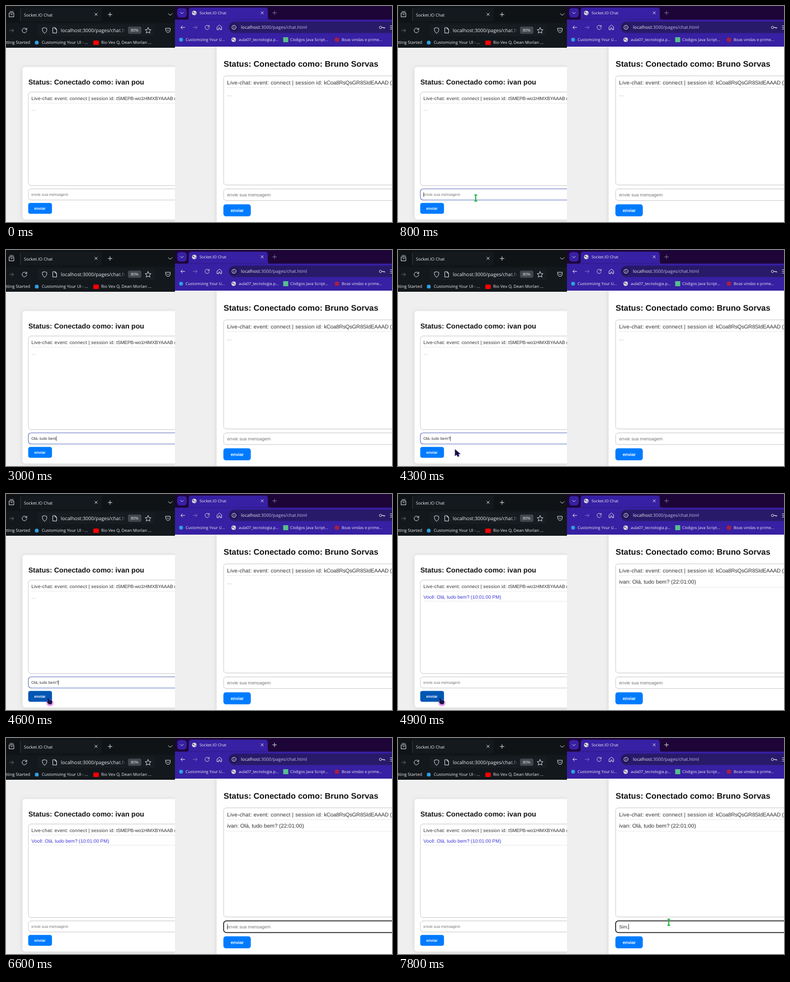
Recreate the animation shown at these times as an HTML page. Size 690 by 388 pixels, loop 8 s.

```html
<!DOCTYPE html>
<html lang="pt-BR">
<head>
<meta charset="utf-8">
<title>Chat</title>
<style>
html, body { margin: 0; width: 100%; height: 100%; overflow: hidden; background: #efefef; }
#stage { display: block; width: 690px; height: 388px; }
text { text-rendering: geometricPrecision; white-space: pre; }
.ui { font-family: "Open Sans", "Noto Sans", sans-serif; fill: #ececf0; }
.page { font-family: "Liberation Sans", Arial, sans-serif; fill: #333; }
.icon { fill: none; stroke: #d6d6de; stroke-width: 1; stroke-linecap: round; stroke-linejoin: round; }
.dim { opacity: .4; }
.title { font-weight: bold; fill: #121212; }
.card { fill: #fff; filter: drop-shadow(0 1px 4px rgba(0, 0, 0, .11)); }
.box { fill: #fff; stroke: #ccc; }
.rule { stroke: #ececec; }
.log { letter-spacing: .024em; }
.log tspan { letter-spacing: -.02em; }
.hint { fill: #757575; }
.wait { fill: #999; }
.btn { fill: #007bff; }
.btn.hover { fill: #0056b3; }
.send { fill: #fff; font-weight: bold; text-anchor: middle; }
#left .focus { stroke: #6b7cc0; stroke-width: 1.2; }
#right .focus { stroke: #161616; stroke-width: 1.5; }
.caret { stroke: #222; stroke-width: .8; }
</style>
</head>
<body>
<svg id="stage" viewBox="0 0 690 388">
  <defs>
    <linearGradient id="fade"><stop offset="0" stop-color="#171c21" stop-opacity="0"/><stop offset="1" stop-color="#171c21"/></linearGradient>
    <radialGradient id="glow"><stop offset="0" stop-color="#ff4fc8"/><stop offset=".5" stop-color="#d05ae0" stop-opacity=".7"/><stop offset="1" stop-color="#d05ae0" stop-opacity="0"/></radialGradient>
    <path id="reload" d="M3.4-2.6A4.2 4.2 0 1 0 4.2 .6M4.2-4.4V-1.6H1.4"/>
    <path id="cross" d="M-2.2-2.2 2.2 2.2M2.2-2.2-2.2 2.2"/>
    <path id="plus" d="M-3.5 0H3.5M0-3.5V3.5"/>
    <path id="forward" d="M-3.5 0H3.5M.6-3 3.5 0 .6 3"/>
    <g id="globe"><circle r="4" fill="#dcdce6"/><path d="M-3-1.5-1-2.5 0-.5-1.5 1ZM.5 .5 3 0 1.8 2.6Z" fill="#56566c"/></g>
  </defs>

  <svg id="left" width="302" height="388">
    <rect width="302" height="75" fill="#13181c"/>
    <rect width="302" height="30" fill="#0f1316"/>
    <rect x="27" y="3" width="144" height="25" rx="3" fill="#13191d"/>
    <path d="M26 5V27" stroke="#3a4046"/>
    <g class="icon">
      <path d="M6 12.5H14V19.5H6ZM7 10H13"/>
      <path d="M8.5 15.5H11.5"/>
      <use href="#cross" x="161" y="15"/>
      <use href="#plus" x="186" y="15.3"/>
      <path d="M290 13.5 293.5 17 297 13.5"/>
    </g>
    <text class="ui" x="32" y="18.6" font-size="7.6">Socket.IO Chat</text>

    <rect x="57" y="33" width="209" height="21" rx="3" fill="#171c21"/>
    <g class="icon">
      <use class="dim" href="#forward" x="10" y="44"/>
      <use href="#reload" x="33" y="44"/>
      <path d="M69 39 73 40.4C73 45 72 47 69 49C66 47 65 45 65 40.4Z"/>
      <path d="M84 39H88L90.5 41.5V48.5H84ZM88 39V41.5H90.5"/>
      <path d="M254 38.8 255.6 42.2 259.2 42.6 256.5 45.1 257.3 48.7 254 46.9 250.7 48.7 251.5 45.1 248.8 42.6 252.4 42.2Z"/>
      <path d="M285.5 40H293.5V43.5A4 4 0 0 1 285.5 43.5ZM287.5 42.8 289.5 44.8 291.5 42.8"/>
    </g>
    <text class="ui" x="98" y="47" font-size="8.75">localhost:3000/pages/chat.h</text>
    <rect x="200" y="36" width="15" height="15" fill="url(#fade)"/>
    <rect x="218" y="37" width="24" height="13" rx="3" fill="#42474d"/>
    <text class="ui" x="230" y="46" font-size="7" text-anchor="middle">80%</text>

    <g class="ui" font-size="7.5">
      <text x="43" y="68.3" text-anchor="end">Getting Started</text>
      <circle cx="55" cy="65.7" r="3.5" fill="#2f9fe0"/>
      <text x="64" y="68.3">Customizing Your UI - ...</text>
      <rect x="156" y="62" width="10" height="8" rx="2" fill="#f00"/>
      <text x="170" y="68.3">Rio Vex Q, Dean Morlan ...</text>
    </g>

    <rect y="75" width="302" height="313" fill="#efefef"/>
    <rect class="card" x="29.5" y="109.5" width="320" height="274" rx="5"/>
    <g class="page">
      <text class="title" x="40" y="141.3" font-size="12.56">Status: Conectado como: ivan pou</text>
      <rect class="box" x="40" y="154.5" width="300" height="168" rx="5"/>
      <path class="rule" d="M45 174.5H302"/>
      <text class="log" x="45.5" y="169" font-size="8.47">Live-chat: event: connect | session id: <tspan>tSMEPB-wo1HIMXBYAAAB (10:00:42 PM)</tspan></text>
      <text class="wait" x="45.5" y="187.6" font-size="8.5">...</text>
      <g class="msg">
        <text x="45.5" y="187.7" font-size="8.55" fill="#3a35d6">Você: Olá, tudo bem? (10:01:00 PM)</text>
        <path class="rule" d="M45 192.5H302"/>
      </g>
      <rect class="box field" x="40" y="328.5" width="300" height="20" rx="5"/>
      <text class="hint" x="45.3" y="341.4" font-size="6.95">envie sua mensagem</text>
      <text class="typed" x="45.3" y="341.4" font-size="7" xml:space="preserve"></text>
      <path class="caret" d="M.6 334.5V343"/>
      <rect class="btn" x="39.7" y="353.7" width="42.5" height="19.6" rx="4"/>
      <text class="send" x="60.6" y="366.2" font-size="6.9">enviar</text>
    </g>
  </svg>

  <svg id="right" x="302" width="388" height="388" viewBox="302 0 388 388">
    <rect x="302" width="388" height="73" fill="#3720a3"/>
    <rect x="302" width="388" height="24.5" fill="#1d0538"/>
    <rect x="306" y="3.7" width="17" height="17" rx="5" fill="#3720a3"/>
    <path d="M322.5 24.5Q326.5 24.5 326.5 20V8Q326.5 3 331.5 3H463Q468 3 468 8V20Q468 24.5 472 24.5Z" fill="#3720a3"/>
    <use href="#globe" x="336.5" y="12.6"/>
    <text class="ui" x="346" y="15.2" font-size="7.05">Socket.IO Chat</text>
    <g class="icon">
      <path d="M312 11.5 314.5 14 317 11.5"/>
      <use href="#cross" x="458" y="12.3"/>
      <use id="newTab" href="#plus" x="480" y="12.3"/>
    </g>

    <rect x="398" y="28" width="310" height="20.5" rx="10" fill="#281a68"/>
    <circle cx="407.5" cy="38.3" r="7.5" fill="#22155c"/>
    <g class="icon">
      <use href="#forward" transform="translate(316 38.5) scale(-1 1)"/>
      <use class="dim" href="#forward" x="338" y="38.5"/>
      <use href="#reload" transform="translate(359.5 38.5) scale(.9)"/>
      <path d="M377.5 37.5 381.5 34.3 385.5 37.5V42.5H382.8V39.5H380.2V42.5H377.5Z"/>
      <circle cx="407.5" cy="38.3" r="3.7"/>
      <path d="M407.5 38V40M407.5 36.3V36.4"/>
      <circle cx="669.5" cy="38.5" r="2.2"/>
      <path d="M672 38.5H677V40.2M675 38.5V40"/>
      <path d="M687 35.5H692M687 38.5H692M687 41.5H692"/>
    </g>
    <text class="ui" x="420" y="41.3" font-size="8.07">localhost<tspan fill="#c3b9e8">:3000/pages/chat.html</tspan></text>

    <g class="ui" font-size="7.1">
      <circle cx="313" cy="60.6" r="3.5" fill="#2f9fe0"/>
      <text x="321" y="63">Customizing Your U...</text>
      <use href="#globe" x="407" y="60.6"/>
      <text x="416" y="63">aula07_tecnologia.p...</text>
      <rect x="495.5" y="56" width="9" height="9" fill="#55c08a"/>
      <text x="508" y="63">Códigos Java Script...</text>
      <circle cx="591.5" cy="60.6" r="4" fill="#a5203f"/>
      <text x="600" y="63">Boas vindas e prime...</text>
    </g>

    <svg x="302" y="73" width="388" height="315" viewBox="302 73 388 315">
      <rect x="302" y="73" width="388" height="315" fill="#efefef"/>
      <rect class="card" x="376.5" y="60" width="360" height="340"/>
      <g class="page">
        <text class="title" x="389" y="109.3" font-size="14.6">Status: Conectado como: Bruno Sorvas</text>
        <rect class="box" x="389" y="125.5" width="340" height="196" rx="5"/>
        <path class="rule" d="M395 146.5H690"/>
        <text class="log" x="395.3" y="140.7" font-size="9.68">Live-chat: event: connect | session id: <tspan>kCoa8RsQsGR8SIdEAAAD (22:00:31)</tspan></text>
        <text class="wait" x="395.3" y="161.6" font-size="9.7">...</text>
        <g class="msg">
          <text x="395.3" y="161.4" font-size="9.77">ivan: Olá, tudo bem? (22:01:00)</text>
          <path class="rule" d="M395 167.5H690"/>
        </g>
        <rect class="box field" x="389" y="328.5" width="340" height="21" rx="5"/>
        <text class="hint" x="395.3" y="341.8" font-size="8.2">envie sua mensagem</text>
        <text class="typed" x="395.3" y="341.8" font-size="8.2" xml:space="preserve"></text>
        <path class="caret" d="M.6 334V344"/>
        <rect class="btn" x="388.6" y="356.2" width="49" height="21.5" rx="4.5"/>
        <text class="send" x="413.3" y="369.8" font-size="7.9">enviar</text>
      </g>
    </svg>
  </svg>

  <g id="mouse">
    <path id="arrow" d="M0 0V12L2.8 9.8 5.2 13.5 7.6 12 6 8.8 9.6 8.2Z" fill="#15123f" stroke="#4a3a9c" stroke-width=".6"/>
    <g id="hand">
      <ellipse cx="3.5" cy="8" rx="8" ry="7" fill="url(#glow)"/>
      <path d="M-1 0Q0-1 1 0L2.5 3 6.5 3.6Q8 4 7.6 6L6.5 10H1.5L-1.8 6.3Q-2 5 .2 5.4Z" fill="#17123f"/>
    </g>
    <path id="beam" d="M-2.5-5.5H2.5M0-5.5V5.5M-2.5 5.5H2.5" fill="none" stroke="#18b837" stroke-width="1.9"/>
  </g>
</svg>
<script>
const LOOP = 8000;
const $ = id => document.getElementById(id);
const show = (el, on) => { el.style.display = on ? '' : 'none'; };
const within = (t, a, b) => t >= a && t < b;

const leftText = 'Olá, tudo bem?';
const leftKeys = [1100, 1400, 1680, 1780, 1980, 2100, 2200, 2300, 2400, 2500, 2600, 2700, 2800, 3100];
const rightText = 'Sim,';
const rightKeys = [7100, 7380, 7580, 7770];
const SENT = 4780;

// Mouse strokes: [time, x, y]
const strokes = [
  [[100, 290, 215], [450, 200, 292], [750, 139, 345], [1100, 139, 345]],
  [[3980, 139, 345], [4150, 139, 345], [4300, 102, 358], [4550, 75, 367.5], [5050, 75, 367.5], [5300, 205, 345], [5600, 386, 312]],
  [[7100, 482, 333], [7600, 484, 331], [LOOP, 484, 331]]
];

function mouseAt(t) {
  const path = strokes.find(p => within(t, p[0][0], p[p.length - 1][0]));
  if (!path) return null;
  const i = path.findIndex(p => p[0] > t);
  const [t0, x0, y0] = path[i - 1], [t1, x1, y1] = path[i];
  const k = (t - t0) / (t1 - t0);
  return { x: x0 + (x1 - x0) * k, y: y0 + (y1 - y0) * k };
}

function chatView(id) {
  const q = name => $(id).querySelector('.' + name);
  const [wait, msg, field, hint, typed, caret, btn] =
    ['wait', 'msg', 'field', 'hint', 'typed', 'caret', 'btn'].map(q);
  const left = +typed.getAttribute('x');
  return s => {
    show(wait, !s.sent);
    show(msg, s.sent);
    show(hint, !s.text);
    show(caret, s.caret);
    field.classList.toggle('focus', s.focus);
    btn.classList.toggle('hover', !!s.hover);
    if (typed.textContent !== s.text) typed.textContent = s.text;
    const width = s.text ? typed.getComputedTextLength() : 0;
    caret.setAttribute('transform', `translate(${left + width} 0)`);
  };
}

const drawLeft = chatView('left'), drawRight = chatView('right');
const typedBy = (text, keys, t) => text.slice(0, keys.filter(k => k <= t).length);

function draw(t) {
  const m = mouseAt(t);
  const inside = (x0, y0, x1, y1) => !!m && within(m.x, x0, x1) && within(m.y, y0, y1);
  const onButton = inside(40, 354, 82, 373);
  const onField = inside(40, 328, 302, 350) || inside(389, 328, 690, 350);
  const sent = t >= SENT;
  const leftFocus = within(t, 800, SENT);
  const rightFocus = t >= 5980;

  drawLeft({
    sent, focus: leftFocus, hover: onButton,
    caret: leftFocus && !within(t, 3600, 4180),
    text: sent ? '' : typedBy(leftText, leftKeys, t)
  });
  drawRight({
    sent, focus: rightFocus, caret: rightFocus,
    text: typedBy(rightText, rightKeys, t)
  });
  $('newTab').style.opacity = rightFocus ? 1 : .5;

  show($('mouse'), m);
  if (m) $('mouse').setAttribute('transform', `translate(${m.x} ${m.y})`);
  show($('arrow'), !onButton && !onField);
  show($('hand'), onButton);
  show($('beam'), onField);
}

function tick() {
  draw(performance.now() % LOOP);
  requestAnimationFrame(tick);
}
tick();
</script>
</body>
</html>
```
